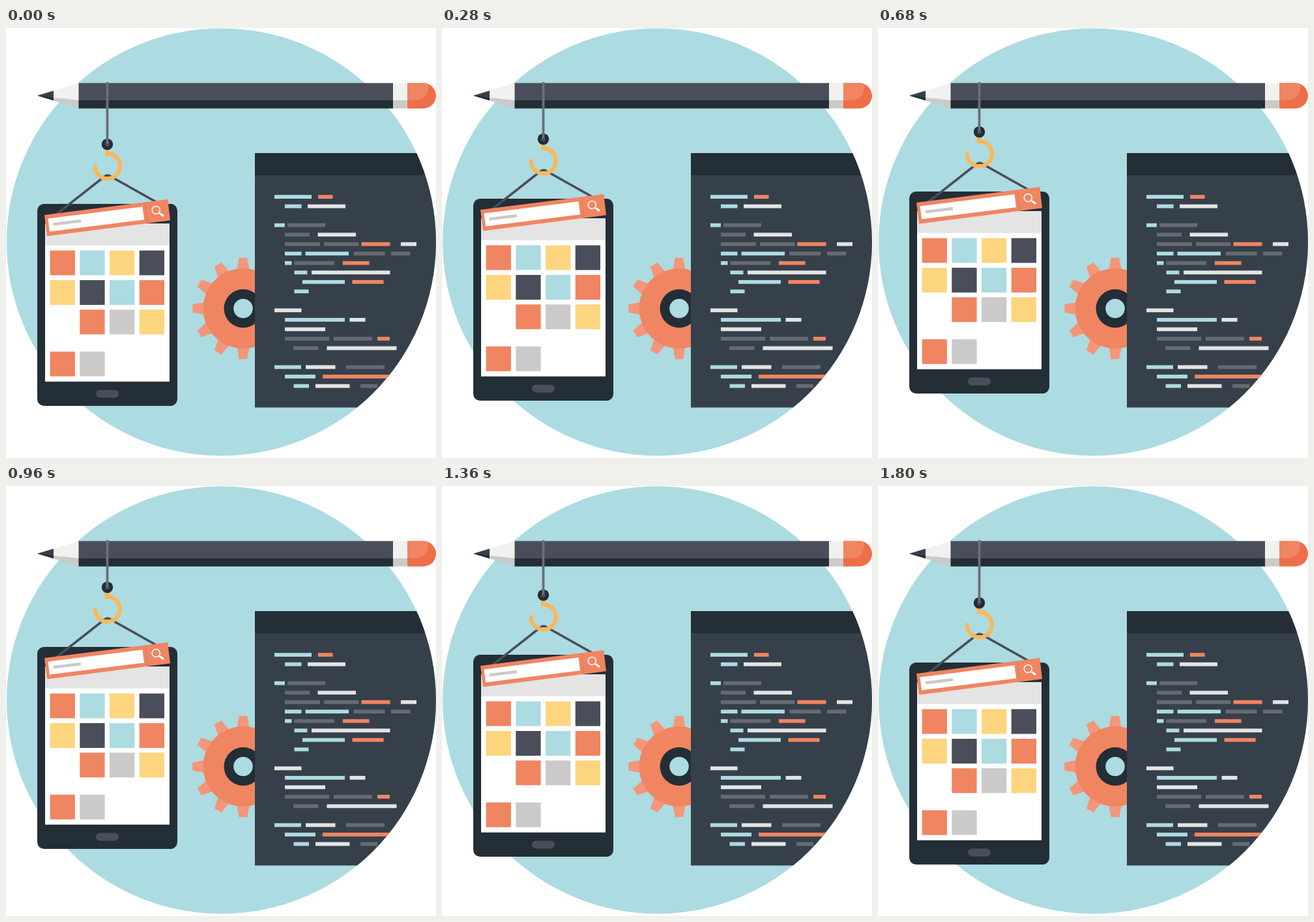
Recreate the animation shown at these times as an HTML page. Size 660 px wide and 660 px high, loop 1840 ms.

```html
<!DOCTYPE html>
<html lang="en">
<head>
<meta charset="utf-8">
<title>Tablet on a crane hook</title>
<style>
html, body { margin: 0; width: 100%; height: 100%; overflow: hidden; background: #fff; }
svg { display: block; width: 100vw; height: 100vh; }
</style>
</head>
<body>
<svg viewBox="0 0 660 660">
  <defs>
    <clipPath id="disc"><ellipse cx="330.5" cy="328.5" rx="329.5" ry="328"/></clipPath>
    <clipPath id="eraser"><path d="M616 84.5H640.5A19.5 19.5 0 0 1 640.5 123.5H616Z"/></clipPath>
  </defs>
  <ellipse cx="330.5" cy="328.5" rx="329.5" ry="328" fill="#acdbe1"/>

  <g id="gear" transform="translate(364 430.5)">
    <g id="teeth" fill="#f4967a"></g>
    <circle r="61.5" fill="#f08562"/>
    <circle r="29.5" fill="#242e36"/>
    <circle r="14.8" fill="#acdbe1"/>
  </g>

  <g clip-path="url(#disc)">
    <path fill="#36404a" d="M382 192H660V582.5H382Z"/>
    <path fill="#242e36" d="M382 192H660V226H382Z"/>
    <g id="code"></g>
  </g>

  <g id="pencil">
    <path fill="#f1f1ef" d="M73 96.3L112 84.5V111L73 107Z"/>
    <path fill="#cbcac8" d="M73 107L112 111V123.5L73 111.3Z"/>
    <path fill="#36404a" d="M48 103.8L73 96.3V111.3Z"/>
    <path fill="#242e36" d="M48 103.8L73 107V111.3Z"/>
    <path fill="#494e5a" d="M111.5 84.5H594V111H111.5Z"/>
    <path fill="#242e36" d="M111.5 111H594V123.5H111.5Z"/>
    <path fill="#f1f1ef" d="M594 84.5H616.5V111H594Z"/>
    <path fill="#cbcac8" d="M594 111H616.5V123.5H594Z"/>
    <g clip-path="url(#eraser)">
      <path fill="#ee6e49" d="M616 84H660V124H616Z"/>
      <path fill="#f08562" d="M616 84H648V90Q648 111 625 111H616Z"/>
    </g>
  </g>

  <g id="load">
    <rect x="48" y="270" width="215" height="310" rx="10.5" fill="#242e36"/>
    <path fill="#fff" d="M60 300H251V542.7H60Z"/>
    <path fill="#e4e4e4" d="M60 300H251V333.7H60Z"/>
    <g id="tiles"></g>
    <rect x="138" y="555.5" width="35" height="12" rx="6" fill="#494e5a"/>
    <path fill="none" stroke="#494e5a" stroke-width="3.6" d="M76 287L151 228Q155.5 224 161 228L234 269"/>
    <path fill="#f08562" d="M59 287L248.3 263L252 295.3L63 319.5Z"/>
    <path fill="#fff" d="M64.5 292.5L209.5 274.3L212 294.3L67 312.5Z"/>
    <path stroke="#cbcac8" stroke-width="4.4" d="M72.5 301.2L115 296"/>
    <path stroke="#d9694a" stroke-dasharray="2 2" d="M214 268L217.5 299.5"/>
    <g fill="none" stroke="#fff">
      <circle cx="230.3" cy="279.5" r="6" stroke-width="1.6"/>
      <path stroke-width="1.6" d="M234.5 283.5L237 285.5"/>
      <path stroke-width="3.2" stroke-linecap="round" d="M237.2 285.2L241 288"/>
    </g>
    <path fill="#fbb75a" d="M152 185H159V196H152Z"/>
    <path fill="none" stroke="#fbb75a" stroke-width="6.2" stroke-linecap="round" d="M155.7 192.8A19.2 19.2 0 1 1 136.5 212"/>
    <circle cx="155.5" cy="178.5" r="8.7" fill="#242e36"/>
  </g>
  <path id="cable" fill="none" stroke="#6b6f78" stroke-width="3.8"/>
  <circle id="pin" cx="155.5" r="1.9" fill="#242e36" stroke="#8b8f96"/>
</svg>
<script>
const $ = id => document.getElementById(id);
const colors = { c: '#acdbe1', o: '#f08562', w: '#e4e4e4', g: '#666a73', y: '#fdd57f', d: '#494e5a', s: '#cbcac8' };
const rect = (x, y, w, h, key) =>
  `<rect x="${x}" y="${y}" width="${w}" height="${h}" fill="${colors[key]}"/>`;

for (let a = 0; a < 360; a += 30)
  $('teeth').innerHTML += `<path transform="rotate(${a})" d="M-9.8-58L-6.2-77.7H6.2L9.8-58Z"/>`;

// Each bar: colour, left, right; an empty row is a blank line.
const lines = [
  'c412-469 o479-501.5', 'c428-453.5 w463-521', '',
  'c412-428 g432-490', 'g428-466 w478.5-537', 'g428-482 g488-541.5 o545.5-589.5 w606-630',
  'c428-453.5 c459.5-526 g533.5-581.5 g591-620.5', 'c428-438.5 g442.5-504 o517-557.5',
  'c442.5-462.5 w469-589.5', 'c455-520 o531.5-579.5', 'c442.5-464.5', '',
  'w412-453.5', 'c428-520 w527.5-551.5', 'w428-490', 'g428-496 g503-562 o570-589',
  'g441-479.5 w492.5-599.5', '',
  'c412-453 w460-505.5 g522-581', 'c428-475 o486-600', 'c441.5-465 w475-527.5 g544-570'
];
$('code').innerHTML = lines.map((line, row) => line.split(' ').filter(Boolean).map(bar => {
  const [left, right] = bar.slice(1).split('-').map(Number);
  return rect(left, 256.2 + row * 14.52, right - left, 5.8, bar[0]);
}).join('')).join('');

const rows = [341.5, 387, 432.3, 496.7];
$('tiles').innerHTML = ['ocyd', 'ydco', ' osy', 'os'].map((keys, r) =>
  [...keys].map((key, i) => key === ' ' ? '' : rect(67.6 + i * 45.7, rows[r], 38.3, 38, key)).join('')
).join('');

// The load rises and sinks at constant speed in whole-pixel steps.
function draw(now) {
  const step = Math.floor(now % 1840 / 40);
  const dy = Math.round(-25 + 26 * Math.abs(step - 22) / 23);
  $('load').setAttribute('transform', `translate(0 ${dy})`);
  $('cable').setAttribute('d', `M155.5 83V${180 + dy}`);
  $('pin').setAttribute('cy', 178.7 + dy);
}

let start;
function tick(now) {
  start ??= now;
  draw(now - start);
  requestAnimationFrame(tick);
}
draw(0);
requestAnimationFrame(tick);
</script>
</body>
</html>
```
